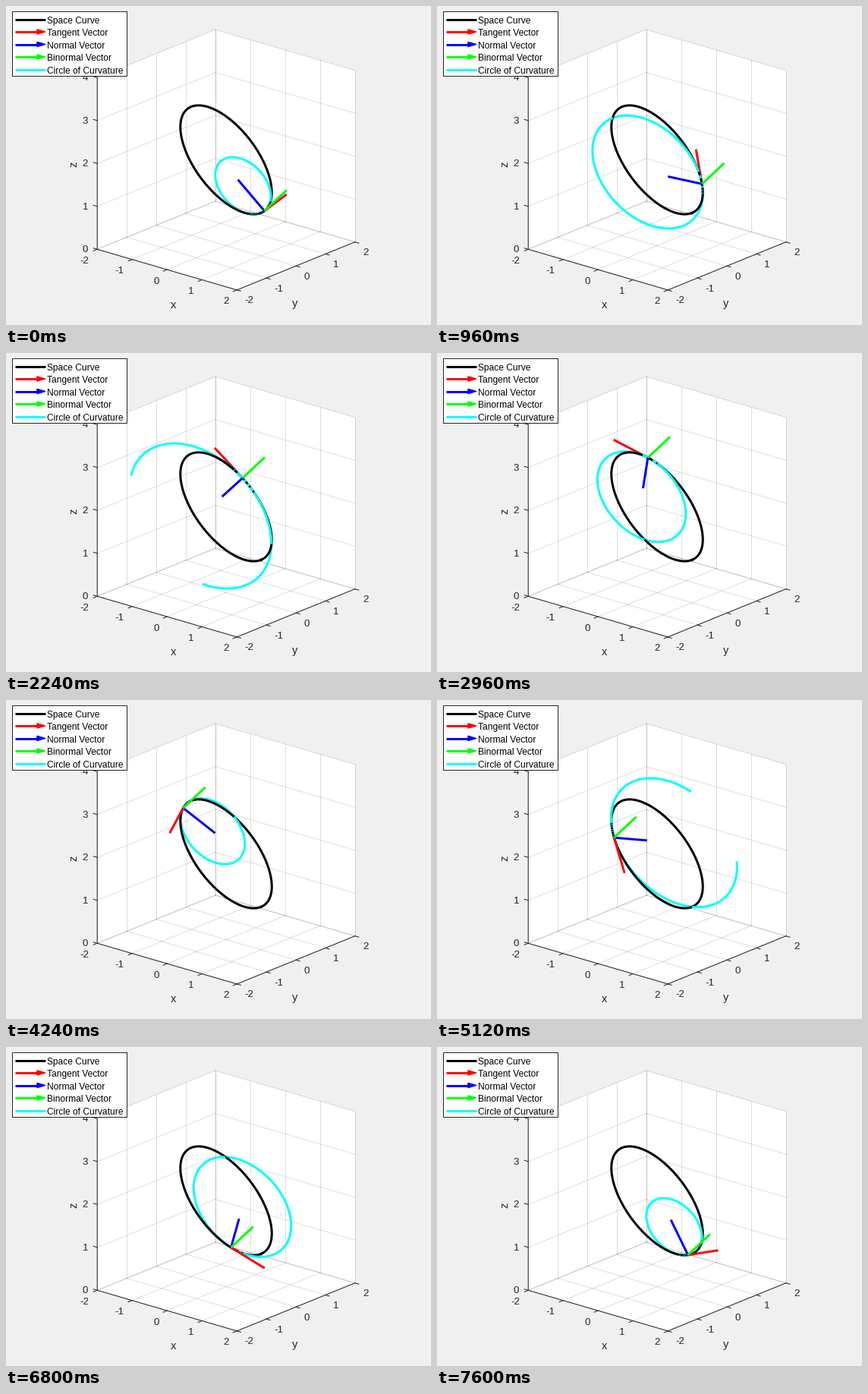
Animation, 560 px wide and 420 px high, one loop 7.68 s. Source, as a matplotlib script:

```python
import numpy as np
import matplotlib
import matplotlib.pyplot as plt
from matplotlib.animation import FuncAnimation
from matplotlib.patches import Polygon, Rectangle

matplotlib.rcParams["font.family"] = "Liberation Sans"

FRAMES, STEP = 96, 2 * np.pi / 99
PX = 0.72                      # points per pixel at 100 dpi
LINE = 3 * PX
INK = "#262626"
ARROW = 0.9

fig = plt.figure(figsize=(5.6, 4.2), dpi=100, facecolor="#f0f0f0")
ax = fig.add_axes([0, 0, 1, 1])
ax.set_xlim(0, 560)
ax.set_ylim(420, 0)
ax.axis("off")


def project(p):
    """Orthographic view of 3D points in stage pixels."""
    x, y, z = np.moveaxis(np.asarray(p, float), -1, 0)
    return np.stack([290 + 46 * x + 38.9 * y,
                     315.5 + 13.4 * x - 15.8 * y - 56.5 * z], -1)


def nearness(p):
    return np.asarray(p) @ np.array([0.606, -0.718, 0.343])


def line3(points, color, width=PX, z=1, **kw):
    return ax.plot(*project(points).T, color=color, lw=width, zorder=z, **kw)[0]


def label(x, y, text, size, ha="center", color=INK, z=5, **kw):
    ax.text(x, y, text, fontsize=size * PX, ha=ha, color=color,
            va=kw.pop("va", "center_baseline"), zorder=z, **kw)


def dense(points, n=6):
    """Split every chord of a polyline into n parts."""
    k = np.arange((len(points) - 1) * n + 1) / n
    i = np.arange(len(points))
    return np.stack([np.interp(k, i, c) for c in points.T], -1)


def draw_box():
    faces = [
        [(-2, -2, 0), (2, -2, 0), (2, 2, 0), (-2, 2, 0)],
        [(-2, -2, 0), (-2, 2, 0), (-2, 2, 4), (-2, -2, 4)],
        [(-2, 2, 0), (2, 2, 0), (2, 2, 4), (-2, 2, 4)],
    ]
    for f in faces:
        ax.add_patch(Polygon(project(f), fc="white", ec="none", zorder=0))
    for v in range(-2, 3):
        h = v + 2
        for seg in (
            [(v, -2, 0), (v, 2, 0)], [(-2, v, 0), (2, v, 0)],
            [(-2, v, 0), (-2, v, 4)], [(-2, -2, h), (-2, 2, h)],
            [(v, 2, 0), (v, 2, 4)], [(-2, 2, h), (2, 2, h)],
        ):
            line3(seg, INK, alpha=0.15)
    line3([(-2, -2, 4), (-2, -2, 0), (2, -2, 0), (2, 2, 0)], INK, z=2)

    for v in range(-2, 3):
        h = v + 2
        line3([(v, -2, 0), (v, -2.13, 0)], INK, z=2)
        line3([(2, v, 0), (2.11, v, 0)], INK, z=2)
        line3([(-2, -2, h), (-2.11, -2, h)], INK, z=2)
        x, y = project((v, -2, 0))
        label(x - 10.7, y + 14, str(v), 13.33, "right")
        x, y = project((2, v, 0))
        label(x + 10.5, y + 13, str(v), 13.33, "left")
        x, y = project((-2, -2, h))
        label(x - 12, y - 0.5, str(h), 13.33, "right")
    label(220.5, 394, "x", 14.67, va="center")
    label(380.5, 392, "y", 14.67, va="center")
    label(89, 208, "z", 14.67, va="center", rotation=90)


def draw_legend():
    ax.add_patch(Rectangle((8, 7), 151, 85, fc="white", ec=INK, lw=PX, zorder=20))
    rows = [("Space Curve", "black", False), ("Tangent Vector", "red", True),
            ("Normal Vector", "blue", True), ("Binormal Vector", "lime", True),
            ("Circle of Curvature", "cyan", False)]
    for i, (text, color, arrow) in enumerate(rows):
        y = 17.5 + 16.5 * i
        ax.plot([12, 44 if arrow else 52], [y, y], color=color, lw=LINE,
                solid_capstyle="butt", zorder=21)
        if arrow:
            ax.add_patch(Polygon([(41, y - 3), (51.5, y), (41, y + 3)],
                                 fc=color, ec=color, lw=1.5 * PX,
                                 joinstyle="round", zorder=21))
        label(54.5, y + 1, text, 12, "left", "black", 21)


draw_box()
draw_legend()

u = np.linspace(0, 2 * np.pi, 100)
curve = np.stack([np.cos(u), np.sin(u), 2 - np.cos(u)], -1)
line3(curve, "black", LINE, 8)
fine = dense(curve)
fine_px, fine_near = project(fine), nearness(fine)


def moving(color, z):
    return ax.plot([], [], color=color, lw=LINE, zorder=z,
                   solid_capstyle="butt")[0]


circle_under, circle_over = moving("cyan", 7), moving("cyan", 9)
tangent, normal, binormal = (moving(c, 10) for c in ("red", "blue", "lime"))
binormal.set_zorder(12)


def set_vector(line, start, direction):
    line.set_data(*project([start, start + ARROW * direction]).T)


def update(i):
    t = (i + 2) * STEP
    c, s = np.cos(t), np.sin(t)
    r = np.array([c, s, 2 - c])
    T = np.array([-s, c, s]) / np.sqrt(1 + s * s)
    B = np.array([1, 0, 1]) / np.sqrt(2)
    N = np.cross(B, T)
    R = (1 + s * s) ** 1.5 / np.sqrt(2)

    ring = dense(r + R * N + R * (np.outer(np.cos(u), T) + np.outer(np.sin(u), N)))
    px = project(ring)
    inside = np.all(np.abs(ring - [0, 0, 2]) <= 2, axis=1)
    px[~inside] = np.nan
    circle_under.set_data(*px.T)

    # The circle covers the curve only where it lies closer to the viewer.
    d2 = ((px[:, None] - fine_px[None]) ** 2).sum(-1)
    d2 = np.where(np.isnan(d2), 1e9, d2)
    k = d2.argmin(1)
    over = (nearness(ring) > fine_near[k]) & (d2.min(1) < 16)
    circle_over.set_data(*np.where(over[:, None], px, np.nan).T)

    set_vector(tangent, r, T)
    set_vector(normal, r, N)
    set_vector(binormal, r, B)
    toward = nearness(N) > 0
    tangent.set_zorder(6 if toward else 10)
    normal.set_zorder(11 if toward else 6)
    return circle_under, circle_over, tangent, normal, binormal


anim = FuncAnimation(fig, update, frames=FRAMES, interval=80,
                     repeat=True, repeat_delay=0, blit=False)
plt.show()
```
